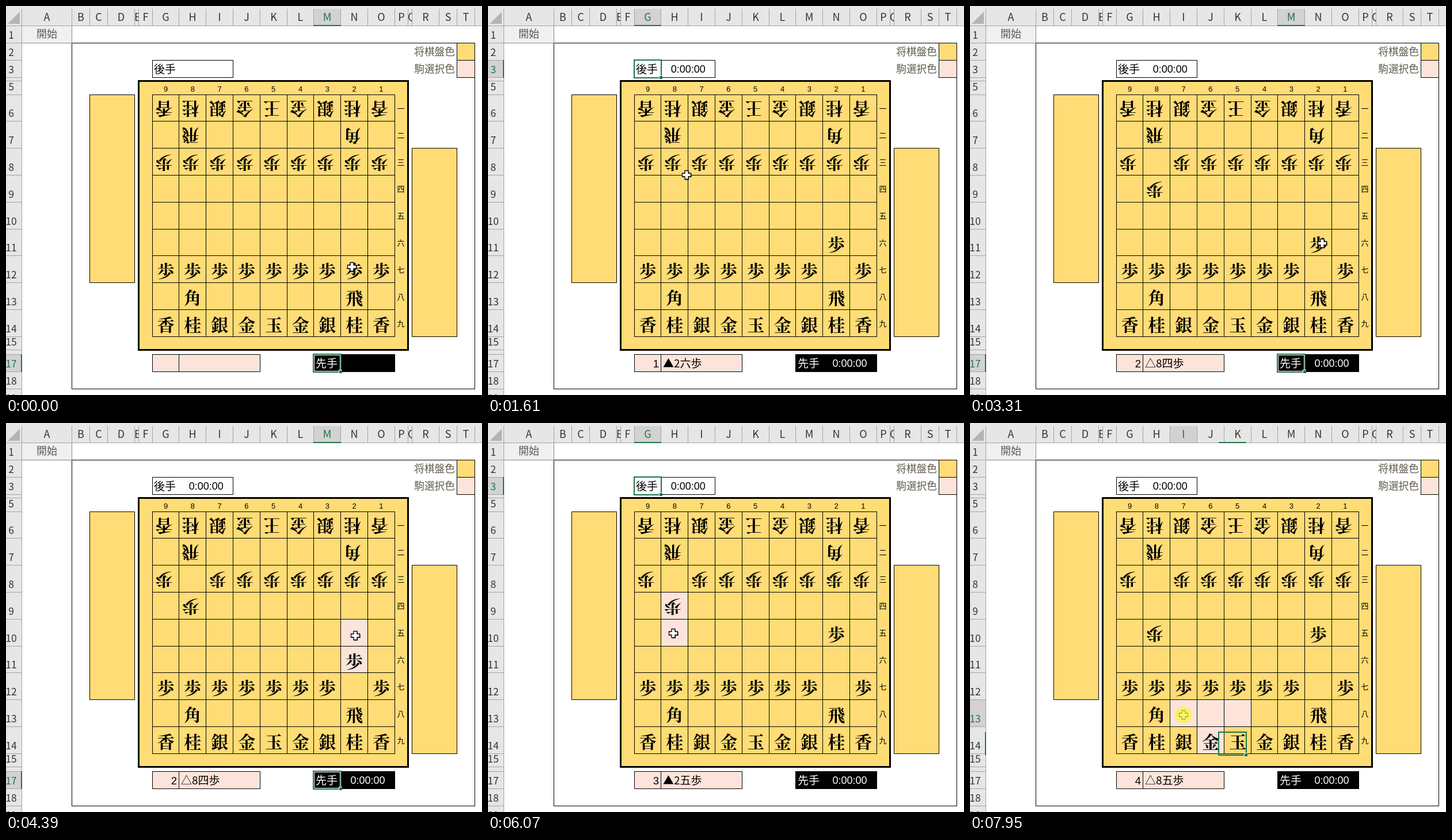
An HTML page that plays this animation: 827 by 677 pixels, repeating every 8000 ms.

```html
<!DOCTYPE html>
<html lang="ja">
<head>
<meta charset="utf-8">
<title>将棋盤</title>
<style>
  html, body { margin: 0; width: 100%; height: 100%; overflow: hidden; background: #fff; }
  svg { display: block; }
  text { font-family: "Noto Sans CJK JP", "Noto Sans CJK", sans-serif; white-space: pre; }
  .num { font-family: "Liberation Sans", sans-serif; }
  .bold { font-weight: 500; }
  .piece { font-family: "Noto Serif CJK JP", "Noto Sans CJK JP", "Noto Sans CJK", serif; font-weight: 700; }
</style>
</head>
<body>
<svg id="stage" width="827" height="677" viewBox="0 0 827 677"></svg>
<script>
const LOOP = 8000, STEP = 63;
const GREEN = '#217346', WOOD = '#ffdc75', PINK = '#fce4da', HEAD = '#e6e6e6', GREY = '#d2d2d2', EDGE = '#a3a3a3';
const RANKS = '一二三四五六七八九';

// Sheet geometry: nine equal squares with margins around them, edges on whole pixels.
const SIDE = 46.8, SQUARES = Array(9).fill(SIDE);
const edges = (start, sizes) => {
  let at = start;
  return [start, ...sizes.map(size => at += size)].map(v => Math.floor(v + .001));
};
const COLS = [...'ABCDEFGHIJKLMNOPQRST'];
const COL_X = edges(27.6, [86.8, 31.2, 31.2, SIDE, 7, 23.4, ...SQUARES, 23.4, 7, SIDE, 31.2, 31.2]);
const ROW_Y = edges(34.2, [30, 30, 30, 6.4, 23.4, ...SQUARES, 23.4, 8, 30, 30, 30]);

// Clicks alternate between lifting a piece and dropping it. A square is file * 10 + rank;
// "steps" is how long the picture keeps changing, "lead" how far the selection is on the first step.
const CLICKS = [
  { at: 50, sq: 27, x: 601, y: 454, steps: 12 },
  { at: 990, sq: 26, x: 595, y: 413, steps: 12, lead: .37 },
  { at: 1930, sq: 83, x: 325, y: 284, steps: 9 },
  { at: 2680, sq: 84, x: 327, y: 325, steps: 10 },
  { at: 3770, sq: 26, x: 612, y: 413, steps: 11 },
  { at: 4590, sq: 25, x: 607, y: 368, steps: 9 },
  { at: 5320, sq: 84, x: 315, y: 321, steps: 11, lead: 0 },
  { at: 6200, sq: 85, x: 322, y: 366, steps: 12 },
  { at: 7200, sq: 69, x: 412, y: 553, steps: 7 },
  { at: 7950, sq: 78, x: 371, y: 508, steps: 1, lead: .545 }
];

// Reach of the pieces that get lifted, as square offsets for the player moving up.
const REACH = { 歩: [-1], 金: [-1, 9, -11, 10, -10, 1] };

const rect = (x, y, w, h, fill, extra = '') =>
  `<rect x="${x}" y="${y}" width="${w}" height="${h}" fill="${fill}" ${extra}/>`;
const text = (x, y, str, size, fill = '#000', anchor = 'middle', cls = '') =>
  `<text x="${x}" y="${y}" font-size="${size}" fill="${fill}" text-anchor="${anchor}" class="${cls}">${str}</text>`;
const path = (d, color, width = 1) => `<path d="${d}" fill="none" stroke="${color}" stroke-width="${width}"/>`;
const range = n => [...Array(n).keys()];

// A bordered range of cells, given by its first and last column letter and row number.
const colX = name => COL_X[COLS.indexOf(name)];
function box(c1, r1, c2, r2, fill, width = 1) {
  const x = colX(c1), y = ROW_Y[r1 - 1];
  return rect(x + .5, y + .5, COL_X[COLS.indexOf(c2) + 1] - x, ROW_Y[r2] - y, fill,
    `stroke="#000" stroke-width="${width}"`);
}

const cell = (col, row) => ({
  col, row, x: COL_X[col], y: ROW_Y[row - 1],
  w: COL_X[col + 1] - COL_X[col], h: ROW_Y[row] - ROW_Y[row - 1]
});
const square = sq => cell(15 - Math.floor(sq / 10), sq % 10 + 5);
const HOME = [cell(12, 17), cell(6, 3)];

function startBoard() {
  const board = {};
  [...'香桂銀金王金銀桂香'].forEach((name, i) => {
    const file = (9 - i) * 10;
    board[file + 1] = { name, flip: true };
    board[file + 3] = { name: '歩', flip: true };
    board[file + 7] = { name: '歩', flip: false };
    board[file + 9] = { name: name === '王' ? '玉' : name, flip: false };
  });
  board[82] = { name: '飛', flip: true };
  board[22] = { name: '角', flip: true };
  board[88] = { name: '角', flip: false };
  board[28] = { name: '飛', flip: false };
  return board;
}

function reach(board, sq) {
  const { name, flip } = board[sq];
  return REACH[name].map(d => sq + (flip ? -d : d))
    .filter(to => to % 10 && (!board[to] || board[to].flip !== flip));
}

function slide(a, b, p) {
  const mix = key => Math.round(a[key] + (b[key] - a[key]) * p);
  const goal = p > 0 ? b : a;
  return { x: mix('x'), y: mix('y'), w: mix('w'), h: mix('h'), col: goal.col, row: goal.row, still: p === 0 || p === 1 };
}

// The pointer leaves a click after one step and eases out to the next one.
function pointerAt(i, k) {
  const a = CLICKS[i], b = CLICKS[i + 1] || a;
  const u = Math.max(0, k - 1) / Math.max(1, a.steps - 1);
  const e = 1 - (1 - u) ** 2;
  return [Math.round(a.x + (b.x - a.x) * e), Math.round(a.y + (b.y - a.y) * e)];
}

function stateAt(t) {
  const s = {
    board: startBoard(), lit: [], count: 0, note: '', press: false,
    sel: slide(HOME[0], HOME[0], 0), pointer: pointerAt(0, 0)
  };
  for (const [i, { at, sq, steps, lead = .4 }] of CLICKS.entries()) {
    if (at > t) break;
    const k = Math.min(steps, Math.floor((t - at) / STEP));
    const target = square(sq);
    s.press = k < 3;
    s.pointer = pointerAt(i, k);
    if (k < 2) {
      s.sel = slide(HOME[s.count % 2], target, Math.min(1, lead + k * .5));
      break;
    }
    if (i % 2) {
      const from = CLICKS[i - 1].sq;
      s.board[sq] = s.board[from];
      delete s.board[from];
      s.note = '▲△'[s.count % 2] + Math.floor(sq / 10) + RANKS[sq % 10 - 1] + s.board[sq].name;
      s.count++;
      s.lit = [];
    } else {
      s.lit = [sq, ...reach(s.board, sq)];
    }
    s.sel = slide(target, HOME[s.count % 2], Math.min(1, (k - 2) * .5));
  }
  return s;
}

function headers(sel) {
  const top = cell(sel.col, 1), left = cell(0, sel.row);
  let out = rect(0, 0, 827, 34, HEAD) + rect(0, 34, 27, 643, HEAD)
    + rect(top.x, 5, top.w, 29, GREY) + rect(0, left.y, 27, left.h, GREY)
    + '<path d="M24 10V31H3Z" fill="#b4b4b4"/>'
    + path('M0 34.5H827' + COL_X.map(x => `M${x + .5} 5V34`).join('')
      + 'M27.5 34V677' + ROW_Y.map(y => `M0 ${y + .5}H27`).join(''), EDGE);
  COLS.forEach((name, i) => {
    const { x, w } = cell(i, 1), narrow = w < 10;
    out += `<svg x="${x}" y="5" width="${w}" height="29">`
      + text(narrow ? 0 : w / 2 + .5, 21, name, 18, i === sel.col ? GREEN : '#333', narrow ? 'start' : 'middle') + '</svg>';
  });
  range(19).forEach(i => {
    if (cell(0, i + 1).h > 10) out += text(9, ROW_Y[i + 1] - 7.5, i + 1, 17.5, i + 1 === sel.row ? GREEN : '#333');
  });
  return out + rect(sel.x, 33, sel.w + 1, 2, GREEN) + rect(26, sel.y, 2, sel.h + 1, GREEN);
}

function sheet() {
  return rect(0, 0, 827, 677, '#fff') + rect(28, 35, 86, 29, '#f0f0f0')
    + box('B', 2, 'T', 18, 'none') + path('M115 64.5H815', '#000')
    + path('M28 64.5H115M114.5 35V64', '#7f8a85') + text(71, 55, '開始', 18, '#595959')
    + text(780, 86, '将棋盤色', 17.7, '#5f5a4c', 'end') + text(780, 116, '駒選択色', 17.7, '#5f5a4c', 'end')
    + box('T', 2, 'T', 2, WOOD) + box('T', 3, 'T', 3, PINK)
    + box('C', 6, 'D', 12, WOOD) + box('R', 8, 'S', 14, WOOD)
    + box('F', 5, 'P', 15, WOOD, 3);
}

function boardView({ board, lit }) {
  let out = lit.map(square).map(c => rect(c.x, c.y, c.w, c.h, PINK)).join('');
  out += path(range(10).map(i => `M${COL_X[i + 6] + .5} 154V576M254 ${ROW_Y[i + 5] + .5}H676`).join(''), '#000');
  range(9).forEach(i => {
    out += text(277.5 + i * SIDE, 148.5, 9 - i, 13, '#000', 'middle', 'num')
      + text(686, 183 + i * SIDE, RANKS[i], 13);
  });
  for (const sq in board) {
    const { name, flip } = board[sq], c = square(+sq);
    const x = c.x + c.w / 2 + (flip ? -2.7 : .7), y = c.y + c.h / 2 + (flip ? 2 : 3.5);
    out += `<g transform="translate(${x} ${y})${flip ? ' rotate(180)' : ''}">${text(0, 11, name, 30, '#000', 'middle', 'piece')}</g>`;
  }
  return out;
}

function panels({ count, note }) {
  let out = box('G', 3, 'I', 3, '#fff') + text(257, 116.5, '後手', 19, '#000', 'start', 'bold')
    + box('M', 17, 'O', 17, '#000') + text(538, 629, '先手', 19, '#fff', 'start', 'bold')
    + box('G', 17, 'G', 17, PINK) + box('H', 17, 'J', 17, PINK);
  if (count) {
    out += text(347.7, 115.5, '0:00:00', 18, '#000', 'middle', 'num')
      + text(628.5, 628, '0:00:00', 18, '#fff', 'middle', 'num')
      + text(297, 628.5, count, 18.5, '#000', 'end', 'num') + text(304, 628.5, note, 19, '#000', 'start');
  }
  return out;
}

function selection({ x, y, w, h, still }) {
  const inner = still ? rect(x + 1.5, y + 1.5, w - 2, h - 2, 'none', 'stroke="#fff"') : '';
  return inner + rect(x, y, w + 1, h + 1, 'none', `stroke="${GREEN}" stroke-width="2"`)
    + rect(x + w - 3, y + h - 3, 6, 6, '#fff') + rect(x + w - 2, y + h - 2, 5, 5, GREEN);
}

function pointer([x, y], press) {
  const cross = 'M-3-7.5h6v4.5h4.5v6h-4.5v4.5h-6v-4.5h-4.5v-6h4.5z';
  const shadow = press ? '' : `<path d="${cross}" transform="translate(1 1)"/>`;
  const glow = press ? '<circle r="14.5" fill="#fbf53c" opacity=".7"/>' : '';
  return `<g transform="translate(${x} ${y})">${shadow}<path d="${cross}" fill="#fff" stroke="#000" stroke-width="1.3"/>${glow}</g>`;
}

const stage = document.getElementById('stage');

function draw(t) {
  const s = stateAt(t);
  const picture = sheet() + headers(s.sel) + panels(s) + boardView(s) + selection(s.sel) + pointer(s.pointer, s.press);
  if (picture !== draw.last) stage.innerHTML = draw.last = picture;
}

const begin = performance.now();
function tick() {
  draw((performance.now() - begin) % LOOP);
  requestAnimationFrame(tick);
}
tick();
</script>
</body>
</html>
```
